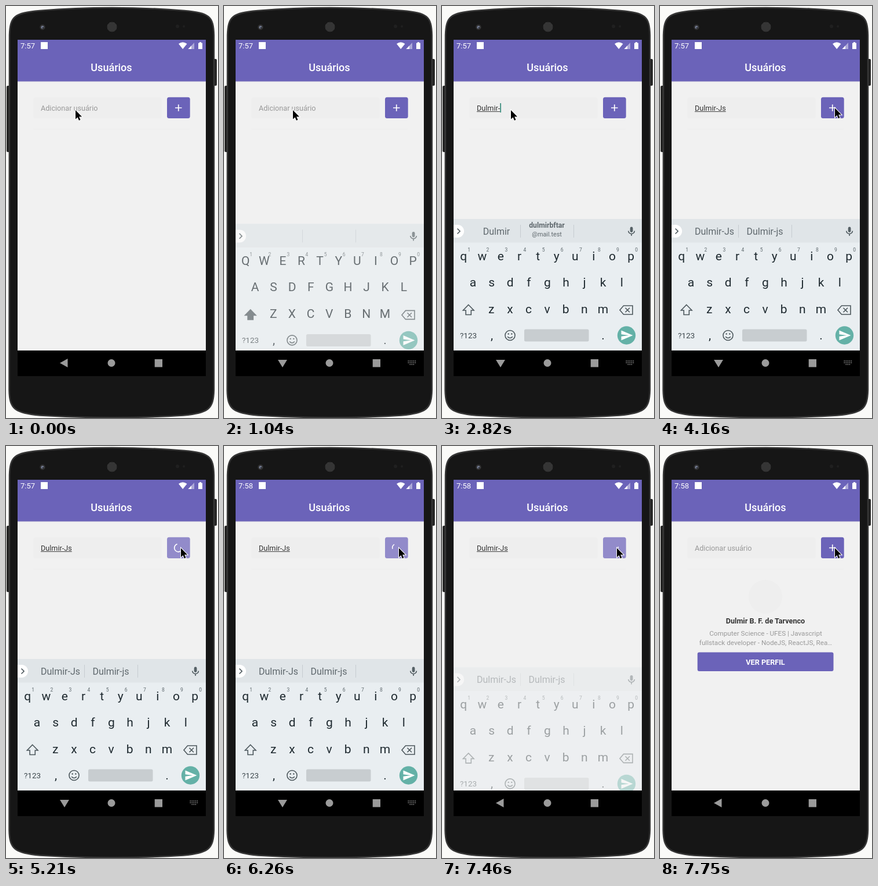
An HTML page for the animation above (8 s loop, 366 px wide and 708 px high).

```html
<!DOCTYPE html>
<html lang="pt-BR">
<head>
<meta charset="utf-8">
<title>Usuários</title>
<style>
  html, body { margin: 0; width: 100%; height: 100%; overflow: hidden; background: #fafaf8; }
  svg { display: block; width: 366px; height: 708px; font-family: Roboto, sans-serif; }
  .mid { text-anchor: middle; }
  .key { font-size: 21px; fill: #1e292f; }
  .hint { font-size: 8.5px; fill: #5d676c; }
  .word { font-size: 16px; fill: #5f686d; }
  .line { fill: none; stroke: #4c575c; stroke-width: 1.6; }
  .bio { font-size: 11.7px; fill: #999; }
</style>
</head>
<body>
<svg viewBox="0 0 366 708">
  <!-- phone body -->
  <rect x="1" y="137" width="6" height="114" rx="2" fill="#242424"/>
  <rect x="358" y="91" width="6" height="46" rx="2" fill="#242424"/>
  <path d="M6 50C7 18 14 12 58 8Q183-2 308 8C352 12 358 18 359 50V660C358 693 350 699 306 703.500Q183 711 59 703.500C15 699 6 693 5.500 660Z" fill="#161616" stroke="#353535" stroke-width="2.500"/>
  <circle cx="63" cy="36.500" r="4.700" fill="#303030"/><circle cx="63" cy="36.500" r="2.500" fill="#747c92"/><circle cx="64" cy="37.500" r="1.200" fill="#22242c"/>
  <circle cx="183" cy="36" r="8.500" fill="#4b4b4b"/>
  <g id="mesh" fill="#161616"></g>
  <circle cx="296" cy="35" r="3" fill="#202020"/><circle cx="307" cy="35" r="2" fill="#202020"/>

  <!-- app -->
  <rect x="20" y="58" width="325" height="578" fill="#f1f1f1"/>
  <rect x="20" y="129" width="325" height="1.500" fill="#d9d8e2"/>
  <rect x="20" y="58" width="325" height="71.500" fill="#6b63b9"/>
  <g fill="#fff">
    <text id="clock" x="25" y="73" font-size="13"></text>
    <rect x="60" y="62" width="12" height="12"/>
    <path d="M298 65Q305 59.500 312.500 65L305.200 74Z"/>
    <path d="M325 63V74H314.500Z" opacity=".45"/><path d="M320 68.200V74H314.500Z"/>
    <path d="M334 62h3v1.500h2v10.500h-7v-10.500h2z"/>
    <text x="182" y="111.500" class="mid" font-size="18" font-weight="500">Usuários</text>
  </g>
  <rect x="47" y="157" width="222" height="36" rx="3.500" fill="#eee"/>
  <rect x="47" y="211" width="270" height="1" fill="#ededed"/>
  <text id="hint" x="60" y="179.500" font-size="12.640" fill="#999">Adicionar usuário</text>
  <text id="typed" x="60" y="179.500" font-size="12.640" fill="#333"></text>
  <rect id="under" x="60" y="181" height="1" fill="#444"/>
  <rect id="caret" y="167" width="1.800" height="16" fill="#3f9080"/>
  <rect id="add" x="278" y="156.700" width="39.700" height="36.300" rx="3.500"/>
  <path id="plus" d="M292 175h11.500M297.750 169.250v11.500" stroke="#fff" stroke-width="1.700"/>
  <path id="arc" fill="none" stroke="#fff" stroke-width="1.600"/>

  <g id="profile" class="mid">
    <circle cx="182" cy="259" r="29" fill="#eee"/>
    <text x="182" y="305" font-size="12.640" font-weight="700" fill="#333">Dulmir B. F. de Tarvenco</text>
    <text x="182.500" y="326" class="bio">Computer Science - UFES | Javascript</text>
    <text x="182.500" y="342" class="bio">fullstack developer - NodeJS, ReactJS, Rea…</text>
    <rect x="64.700" y="354.500" width="234.800" height="32.500" rx="3" fill="#6b63b9"/>
    <text x="182" y="376" font-size="12.640" font-weight="700" fill="#fff">VER PERFIL</text>
  </g>

  <g id="keyboard">
    <rect x="20" y="366" width="325" height="226" fill="#e9eef1"/>
    <rect x="20" y="366" width="325" height="40.500" fill="#e0e5e8"/>
    <path d="M20 376h7a11 11 0 0 1 0 22h-7z" fill="#fff"/>
    <path d="M26.500 382.500l4.500 4.500-4.500 4.500" class="line"/>
    <path d="M135.500 376v22M227.500 376v22" stroke="#c6ccd0"/>
    <g id="words" class="mid"></g>
    <rect x="324.700" y="379.500" width="4.800" height="9.500" rx="2.400" fill="#566166"/>
    <path d="M321.800 386.500a5.300 5 0 0 0 10.600 0M327.100 391.500v3.500" class="line"/>
    <g id="keys" class="mid"></g>
    <path id="shift" d="M45.700 513.500l9.300 9.500h-4.700v7.500h-9.200v-7.500h-4.700z" class="line"/>
    <path d="M313.500 515h15.500v15h-15.500l-6.500-7.500zM316.500 518.800l7.500 7.500M324 518.800l-7.500 7.500" class="line"/>
    <text x="45.500" y="571" class="mid" font-size="13.500" fill="#3c474c">?123</text>
    <circle cx="117.500" cy="566" r="8.500" class="line"/>
    <path d="M113.300 568a4.600 4.200 0 0 0 8.400 0" class="line"/>
    <circle cx="114.700" cy="563.500" r="1.200" fill="#4c575c"/><circle cx="120.300" cy="563.500" r="1.200" fill="#4c575c"/>
    <rect x="142" y="555.500" width="111.500" height="21" rx="2.500" fill="#c8cdd0"/>
    <circle cx="318.500" cy="566" r="15.700" fill="#64b1a7"/>
    <path d="M309.500 557.500l20 8.500-20 8.500v-6.700l13-1.800-13-1.800z" fill="#fff"/>
  </g>

  <!-- navigation bar -->
  <rect x="20" y="592" width="325" height="44" fill="#000"/>
  <g fill="#9b9b9b">
    <path id="back"/>
    <circle cx="182" cy="613.500" r="6.500"/>
    <rect x="256.700" y="607" width="13.300" height="13.500"/>
    <path id="ime" d="M317.500 610h14M317.500 613h14M320.500 616h8" stroke="#8c8c8c" stroke-width="1.500" stroke-dasharray="1.700 1.300"/>
  </g>
  <path id="cursor" d="M0 0v15.500l3.600-3.300 2.400 5.500 2.500-1.100-2.400-5.300h5z" fill="#000" stroke="#fff" stroke-width="2" paint-order="stroke"/>
</svg>
<script>
const $ = id => document.getElementById(id);
const show = (id, on) => $(id).setAttribute('visibility', on ? 'visible' : 'hidden');
const set = (id, attrs) => { for (const k in attrs) $(id).setAttribute(k, attrs[k]); };
const text = (x, y, cls, str, extra = '') => `<text x="${x}" y="${y}" class="${cls}" ${extra}>${str}</text>`;
const latest = (list, t) => list.filter(item => item[0] <= t).pop();

const LOOP = 8000, PRESS = 4460, DONE = 7610;
const MAIL = 'dulmirbftar @mail.test';
const typing = [
  [0, '', []],
  [1480, 'D', ['D', 'Do', 'Did']],
  [1630, 'Du', ['Du', 'Due', 'During']],
  [1920, 'Dul', ['Dul', 'Dull', 'Duluth']],
  [2220, 'Dulmi', ['Dulmi', 'Dulmir', '']],
  [2370, 'Dulmir', ['Dulmir', MAIL, '']],
  [2820, 'Dulmir-', ['Dulmir', MAIL, '']],
  [3260, 'Dulmir-J', ['Dulmir-J', 'Dulmir-j', 'Dulmir-Jr']],
  [3560, 'Dulmir-Js', ['Dulmir-Js', 'Dulmir-js', '']],
  [DONE, '', []]
];
const pointer = [[0, 120, 179], [300, 119, 179], [3860, 148, 185], [4010, 236, 187], [4160, 302, 175.5]];
const keyboardAlpha = [[0, 0], [750, .15], [900, .65], [1050, 1], [7460, .4], [DONE, 0]];

function drawKeys(caps) {
  const rows = [['qwertyuiop', 37.2, 437], ['asdfghjkl', 53.5, 482], ['zxcvbnm', 85.3, 528]];
  let out = text(86, 573, 'key', ',') + text(278, 573, 'key', '.');
  rows.forEach(([letters, x0, y], row) => [...letters].forEach((c, i) => {
    const x = x0 + i * 32.1;
    out += text(x, y, 'key', caps ? c.toUpperCase() : c);
    if (!row) out += text(x + 9.5, 422, 'hint', (i + 1) % 10);
  }));
  $('keys').innerHTML = out;
  $('shift').style.fill = caps ? '#4c575c' : 'none';
}

function drawWords(words) {
  $('words').innerHTML = words.map((word, i) => {
    const x = 94 + i * 87, [user, host] = word.split(' ');
    return host
      ? text(x, 380.5, 'word', user, 'style="font-size:12.2px;font-weight:700"') +
        text(x, 395.5, 'word', host, 'style="font-size:10.8px"')
      : text(x, 393, 'word', word);
  }).join('');
}

const ease = p => { p = Math.min(1, Math.max(0, p)); return p * p * (3 - 2 * p); };

// Growing and shrinking arc on a steady rotation
function spinner(t) {
  const u = t - 7377, cycle = Math.floor(u / 1333), p = u / 1333 - cycle;
  const base = 55 + u * .157 + 90 * p;
  const tail = base + 270 * ease(p * 2 - 1), head = base + 270 * ease(p * 2) + 8;
  const at = deg => {
    const a = deg * Math.PI / 180;
    return `${297.5 + 6.8 * Math.sin(a)} ${175 - 6.8 * Math.cos(a)}`;
  };
  return `M${at(tail)}A6.8 6.8 0 ${+(head - tail > 180)} 1 ${at(head)}`;
}

let stage;
function render(t) {
  const entry = latest(typing, t), [since, str, words] = entry;
  if (entry !== stage) {
    stage = entry;
    drawKeys(!str);
    drawWords(words);
    $('typed').textContent = str;
  }
  const width = str ? $('typed').getComputedTextLength() : 0;
  show('hint', !str);
  set('under', { width });

  const now = t < PRESS ? t : PRESS + Math.floor((t - PRESS) / 150) * 150;
  const blinkStart = since || 450;
  set('caret', { x: 60 + width });
  show('caret', now >= blinkStart && now < DONE && (now - blinkStart) % 1000 < 500);

  const busy = t >= PRESS && t < DONE;
  set('add', { fill: busy ? '#928bca' : '#6b63b9' });
  show('plus', !busy);
  show('arc', busy);
  if (busy) set('arc', { d: spinner(now) });
  show('profile', t >= DONE);
  $('clock').textContent = t < 5360 ? '7:57' : '7:58';

  const alpha = latest(keyboardAlpha, t)[1];
  set('keyboard', { opacity: alpha, transform: `translate(0 ${(1 - alpha) * 24})` });
  const imeOpen = t >= 750 && t < 7310;
  set('back', { d: imeOpen ? 'M93 608h16l-8 13z' : 'M93 613.5l13.500-7.500v15z' });
  show('ime', imeOpen);

  const [, x, y] = latest(pointer, t);
  set('cursor', { transform: `translate(${x} ${y})` });
}

let holes = '';
for (let x = -8; x <= 8; x += 2)
  for (let y = -8; y <= 8; y += 2)
    if (Math.hypot(x, y) < 8.5) holes += `<circle cx="${183 + x}" cy="${36 + y}" r=".75"/>`;
$('mesh').innerHTML = holes;

const start = performance.now();
function tick() {
  render((performance.now() - start) % LOOP);
  requestAnimationFrame(tick);
}
tick();
</script>
</body>
</html>
```
